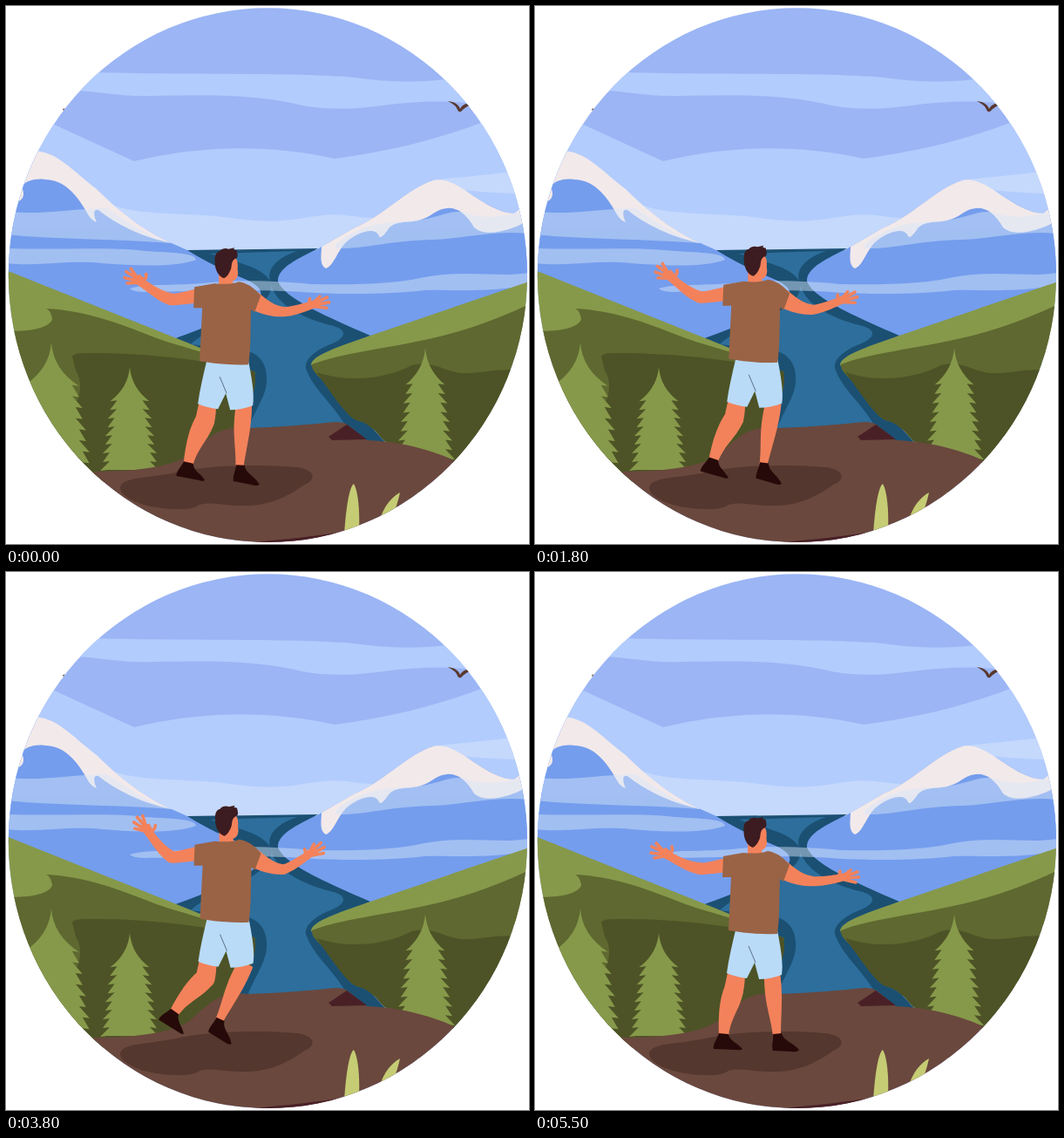
An HTML page that plays this animation: 600 px wide and 617 px high, repeating every 5600 ms.

```html
<!DOCTYPE html>
<html lang="en">
<head>
<meta charset="utf-8">
<title>Mountain view</title>
<style>
html,body{margin:0;width:100%;height:100%;overflow:hidden;background:#fff}
svg{display:block;width:100%;height:100%}
.skin{fill:#f3825b}
.finger{fill:none;stroke:#f3825b;stroke-width:3.6;stroke-linecap:round}
.pine,.light{fill:#86994a}.mid{fill:#5e6830}.dark{fill:#4d5326}
.mount{fill:#749ded}.snow{fill:#f2e9ea}.mist{fill:#d6e6f9;opacity:.47}
.deep{fill:#1b5073}.water{fill:#2d6e9c}
.shoe{fill:#260a09}.grass{fill:#c5cc74}
</style>
</head>
<body>
<svg viewBox="0 0 600 617" preserveAspectRatio="none">
<defs><clipPath id="disc"><ellipse cx="300.4" cy="308.7" rx="297.6" ry="306.4"/></clipPath></defs>
<g clip-path="url(#disc)">
  <rect width="600" height="617" fill="#9bb5f5"/>
  <path fill="#b2ccfd" d="M100 76C200 79 330 76 400 82C440 88 480 88 512 83L536 112C505 108 475 109 440 113C412 117 375 121 340 114C285 101 235 102 170 103C135 105 110 98 78 97Z"/>
  <path fill="#b2ccfd" d="M49 133L147 178C220 160 300 158 377 175C440 167 500 152 552 131L600 200V300H0V140Z"/>
  <g fill="#c5d9fd">
    <path d="M110 222C140 242 200 236 250 242C300 250 325 246 355 241C390 236 400 244 425 243L360 282H180Z"/>
    <path d="M488 200C530 195 565 193 585 189L600 216C565 214 520 213 500 206Z"/>
  </g>

  <path class="mount" d="M0 175L36 167C56 168 74 188 104 211C124 231 155 257 190 272L208 280H360V400H240L0 310Z"/>
  <path class="mount" d="M310 310L362 276L400 254C430 243 462 208 490 200L535 217C553 229 572 238 583 239L600 228V320L415 380L315 330Z"/>
  <path class="snow" d="M30 166C58 166 74 187 104 210C124 230 155 257 190 272C160 266 128 252 106 234C99 232 101 242 104 248C96 245 95 240 88 229C78 213 64 199 45 199C31 197 20 202 18 208C22 215 20 222 14 224L10 200Z"/>
  <path class="snow" d="M362 276L400 254C430 243 462 208 490 200C505 196 522 208 535 217C553 229 570 238 583 238L600 225V246C572 261 548 264 537 254C524 231 508 226 490 238C470 253 452 243 440 254C434 262 431 267 428 264C424 252 402 260 390 271C380 281 376 298 367 301C359 297 362 285 362 276Z"/>

  <path class="deep" d="M208 280L358 278C335 290 311 300 312 316C320 336 370 357 418 378L352 408L440 506L270 505L190 383C220 371 250 362 275 346C298 335 298 324 276 314C252 304 228 293 208 280Z"/>
  <path class="water" d="M234 284L334 281C310 289 299 302 303 316C308 342 340 358 372 366C394 371 390 381 372 388C352 396 340 408 345 418C354 442 378 458 392 486V500H272C284 462 301 448 299 424C298 405 285 398 278 396L212 388C220 379 240 370 262 360C290 347 312 330 302 314C292 299 265 294 234 284Z"/>

  <g class="mist">
    <path d="M0 236C40 240 90 231 115 232L140 248C155 258 172 267 190 272C130 267 60 268 0 262Z"/>
    <path d="M0 278C60 280 120 276 160 281C190 283 217 283 218 291C195 300 150 298 110 295C70 291 40 299 0 295Z"/>
    <path d="M378 274C400 254 428 247 460 247C495 245 510 231 530 238C560 247 580 237 600 236V261C560 257 530 266 490 268C440 269 410 279 378 278Z"/>
    <path d="M142 324C160 318 190 321 225 318C270 313 320 316 350 319C410 320 450 318 480 311C530 302 565 312 600 306V320C550 329 520 325 480 326C440 331 380 331 340 328C290 324 200 328 160 328Q146 328 142 324Z"/>
  </g>

  <path class="light" d="M0 303L198 382L230 395L285 420L260 500L98 550L0 450Z"/>
  <path class="mid" d="M46 347C90 349 130 364 165 378C195 390 225 394 286 420L262 490L98 550L0 470V372C30 375 52 367 53 359C52 352 50 349 46 347Z"/>
  <path class="dark" d="M76 402C78 397 90 398 110 398C160 399 220 404 285 419C290 440 275 470 262 485L205 540L90 545L70 470C88 450 88 430 80 418Z"/>
  <path class="light" d="M600 316L415 379C385 390 350 400 350 412L420 440L600 400Z"/>
  <path class="mid" d="M600 342C560 361 525 373 480 383C435 393 385 398 351 411C350 418 358 424 364 430C378 446 390 470 402 475C415 477 425 488 434 499L530 530L600 420Z"/>
  <path class="dark" d="M356 420C400 434 440 425 466 412C490 406 502 419 522 421C545 422 562 415 590 418L530 530L434 499C425 488 415 477 402 475C390 470 372 442 356 420Z"/>
  <g id="pines" class="pine"></g>

  <path fill="#6a483d" d="M92 534C150 534 188 529 210 515C235 493 245 481 277 484C310 483 350 480 378 477Q388 477 393 481L414 498C455 500 490 509 520 524L480 617H120Z"/>
  <path fill="#4a2027" d="M370 494L391 480L414 497L374 498Z"/>
  <path fill="#4a2027" d="M262 617C310 612 350 610 395 601V617Z"/>
  <path fill="#54372e" d="M131 552C134 540 160 542 195 535C240 525 300 526 335 529C358 533 354 545 342 549C325 562 302 573 276 573C250 574 240 568 222 572C214 577 206 577 195 577C165 577 130 566 131 552Z"/>
  <path class="grass" d="M388 606C390 575 394 551 399 548C404 556 406 580 405 600Z"/>
  <path class="grass" d="M428 592C433 573 443 563 452 558C449 572 446 577 445 584ZM465 572L473 557L472 566Z"/>
  <path fill="#59382f" d="M507 109C516 110 520 114 521 118C524 112 530 111 535 113C528 115 525 118 522 121Q519 122 518 119C516 114 512 112 507 109Z"/>
</g>
<path fill="#59382f" d="M65 118.500L67.500 117L66 120Z"/>

<g id="body">
  <path class="skin" d="M222 455L241 455C241 470 240 476 239 481A11 11 0 0 1 217 478Z"/>
  <g id="legL">
    <path class="skin" d="M217 477C223 466 238 468 239 481C236 500 224 512 222 532L211 532C210 508 212 490 217 477Z"/>
    <path class="shoe" d="M211 529L222 530C223 538 234 541 238 547Q236 549 231 548L205 547C204 541 208 538 211 529Z"/>
  </g>
  <g id="legR">
    <path class="skin" d="M263 459L281 459C285 485 282 508 282 532L273 532C270 508 263 495 263 464Z"/>
    <path class="shoe" d="M273 530L283 529C285 538 297 540 303 548Q301 551 294 550L273 549C271 541 274 538 273 530Z"/>
  </g>
  <path fill="#b9dbf8" d="M230 411L278 411C282 432 285 448 283 462Q270 467 257 467L252 448L243 466Q229 464 220 460C222 444 226 428 230 411Z"/>
  <path d="M245 429L253 448" fill="none" stroke="#45536b" stroke-width=".8"/>
  <path class="skin" d="M222 327V344C210 345 198 347 189 347C181 345 182 335 189 334C200 333 210 330 222 327Z"/>
  <path class="skin" d="M289 332L284 353C296 358 308 361 319 360C324 358 324 351 319 349C308 347 300 342 289 332Z"/>
  <g id="armL">
    <path class="skin" d="M192 333.500C180 333 168 328 159 323L150 316L141 322L148 328C160 334 175 345 189 347Z"/>
    <path class="finger" d="M149 322L139 311M147 321L134 315M147 324L133 322M149 326L137 328M153 324Q159 321 157 315"/>
  </g>
  <g id="armR">
    <path class="skin" d="M317 349C328 350 338 348 346 347L356 345L361 352L352 355C340 358 328 361 317 360Z"/>
    <path class="finger" d="M353 349L362 342M355 349L370 344M356 351L371.500 350M355 353L368 356M349 349L350 343"/>
  </g>
  <path class="skin" d="M244 305L256 293C266 290 266 297 265.500 306C267 312 265 318 260 319L261 325L244 324Z"/>
  <path fill="#3c1c20" d="M239.500 296C239 290 241 286 245 285C247 282 252 281 255 282.500L262 281L261 283L264.500 284L265.500 289Q266 293 262 294C258 297 259 302 258 305C256 310 254 314 250 316C243 314 239 305 239.500 296Z"/>
  <path fill="#9a6345" d="M239 322C250 323 260 323 267 320C280 322 288 331 292 336L285 355L281 352C280 375 281 395 278 415C258 416 240 414 222 411C223 390 224 370 225 350L215 350L216 326Z"/>
</g>
</svg>
<script>
const $ = id => document.getElementById(id);
const LOOP = 5600, STEP = 100, SWING = 3030, LEAD = 530;

// A conifer: a concave spire, then drooping branch tips down both sides
function pine(x, top, bottom, half, tiers) {
  const h = bottom - top, start = top + h * .33, gap = (bottom - start) / tiers;
  const side = s => {
    const pts = [];
    for (let i = 0; i <= tiers; i++) {
      const w = half * (.66 + .34 * i / tiers) * (i % 2 ? .95 : 1), y = start + gap * i;
      pts.push([x + s * w, y], [x + s * (w - 8), y - 1]);
    }
    return pts;
  };
  const right = side(1), left = side(-1).reverse();
  const line = pts => pts.map(p => 'L' + p).join('');
  const spire = s => [x + s * 2, top + h * .2];
  return `<path d="M${x} ${top}Q${spire(1)} ${right[0]}${line(right.slice(1))}${line(left)}Q${spire(-1)} ${x} ${top}Z"/>`;
}
$('pines').innerHTML = pine(52, 386, 537, 48, 8) + pine(142, 414, 533, 34, 8) + pine(481, 392, 520, 34, 8);

const turn = (id, deg, x, y) => $(id).setAttribute('transform', `rotate(${deg} ${x} ${y})`);

function draw(t) {
  const p = (1 - Math.cos(2 * Math.PI * (t + LEAD) / SWING)) / 2;
  $('body').setAttribute('transform', `translate(${.6 * p} ${-14 * p})`);
  turn('legL', 31 * p, 228, 479);
  turn('legR', 31 * p, 268, 466);
  turn('armL', 26 * p, 189, 341);
  turn('armR', -25 * p, 318, 356);
}

const begin = performance.now();
function tick() {
  const t = (performance.now() - begin) % LOOP;
  draw(Math.floor(t / STEP) * STEP);
  requestAnimationFrame(tick);
}
draw(0);
requestAnimationFrame(tick);
</script>
</body>
</html>
```
